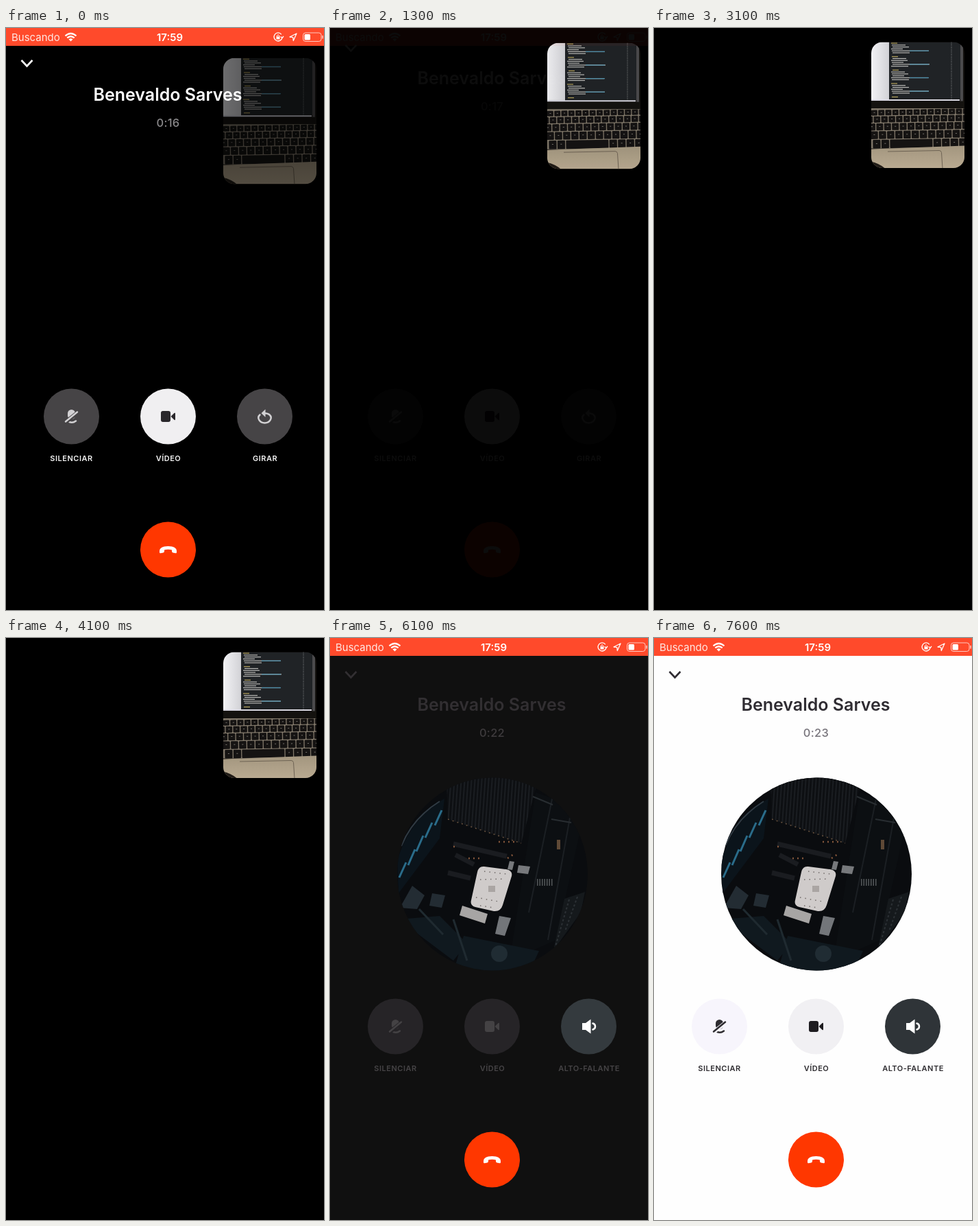
An HTML page for the animation above (8 s loop, 464 by 848 pixels).

```html
<!DOCTYPE html>
<html lang="pt">
<head>
<meta charset="utf-8">
<title>Chamada</title>
<style>
html, body { margin: 0; width: 100%; height: 100%; overflow: hidden; background: #000; }
svg { display: block; width: 464px; height: 848px; font-family: Inter, Roboto, sans-serif; }
.label text { font-size: 11px; font-weight: 600; letter-spacing: .5px; text-anchor: middle; fill: var(--label); }
.icon { fill: var(--icon); stroke: var(--icon); stroke-width: 0; }
.line { fill: none; stroke-width: 2.5; stroke-linecap: round; }
</style>
</head>
<body>
<svg viewBox="0 0 464 848">
  <defs>
    <clipPath id="thumbClip"><rect width="136" height="183.5" rx="16"/></clipPath>
    <clipPath id="avatarClip"><ellipse cx="237" cy="344" rx="139" ry="140.5"/></clipPath>
    <linearGradient id="palm" x2="0" y2="1"><stop stop-color="#a3967f"/><stop offset="1" stop-color="#b9aa91"/></linearGradient>
    <linearGradient id="page"><stop stop-color="#f2f2f5"/><stop offset="1" stop-color="#d2d2d6"/></linearGradient>
    <pattern id="ribs" width="5" height="10" patternUnits="userSpaceOnUse" patternTransform="skewX(-4)">
      <path d="M0 0H5V10H0Z" fill="#0d0f12"/><path d="M1 0V10" stroke="#202429" stroke-width="1.3"/>
    </pattern>
  </defs>

  <rect id="back" width="464" height="848"/>

  <g id="thumb"><g clip-path="url(#thumbClip)">
    <path d="M0 0H136V184H0Z" fill="#14120f"/>
    <path d="M0 0H26V84H0Z" fill="url(#page)"/>
    <path d="M26 0H130V83H26Z" fill="#202326"/>
    <path d="M117 0V83" stroke="#55585a" stroke-width="2" stroke-dasharray="1 1.5"/>
    <path d="M130 0H134V86H130Z" fill="#4b4a4c"/>
    <path d="M0 83.5H129V85.5H0Z" fill="#d9d8e2"/>
    <g id="code"></g>
    <path d="M0 96.5H136V155H0Z" fill="#81786a"/>
    <g id="keys"></g>
    <path d="M0 156L136 151V184H0Z" fill="url(#palm)"/>
    <path d="M24 159.5L99 158Q102 158 102.5 161L104 184" fill="none" stroke="#6d6253" stroke-width="1"/>
    <path d="M0 174Q12 177 20 184H0Z" fill="#211c17"/>
  </g></g>

  <rect id="dim" width="464" height="848"/>

  <g id="avatar" clip-path="url(#avatarClip)">
    <path d="M98 200H378V486H98Z" fill="#0a0c0f"/>
    <path d="M170 204L305 200 279 299 172 264Z" fill="url(#ribs)"/>
    <path d="M172 264L279 299" stroke="#67513d" stroke-width="1.5" stroke-dasharray="2 5"/>
    <path d="M300 225L372 250 330 440 262 470Z" fill="#0c0f12"/>
    <path d="M325 230L290 400M350 262L318 440" stroke="#1b1f23" stroke-width="2"/>
    <path d="M98 325Q115 265 167 234L160 292 100 372Z" fill="#0b141b"/>
    <path d="M104 303Q121 262 160 238" fill="none" stroke="#303b44" stroke-width="2"/>
    <path d="M163 251L153 273M149 269L139 291M136 288L126 311M124 308L114 331M111 327L101 349" stroke="#2a6c8a" stroke-width="3"/>
    <path d="M120 361L138 375 127 395 102 393ZM149 372L168 375 163 393 145 390Z" fill="#232c33"/>
    <path d="M100 410L160 405 200 445 180 470ZM195 434L305 456 290 488H180Z" fill="#10191f"/>
    <path d="M130 395L165 432M180 410L200 470" stroke="#1f2a30" stroke-width="3"/>
    <circle cx="247" cy="460" r="12" fill="#202c33"/>
    <path d="M180 300L258 318M172 342L205 350M183 316L210 330" stroke="#1a1c20" stroke-width="7"/>
    <path d="M202 321H222M246 297H272M259 321L268 315M180 304H184" stroke="#82553a" stroke-width="2.5" stroke-dasharray="2 5"/>
    <path d="M225 333L257 337Q267 339 265 347L252 389Q249 399 239 398L212 392Q204 390 206 382L215 341Q217 332 225 333Z" fill="#cfcbca"/>
    <path d="M225 340L258 344M219 352L254 351M213 378L246 384M219 390L239 393" stroke="#716b69" stroke-width="1.5" stroke-dasharray="1.5 6"/>
    <path d="M231 361H241V370H231Z" fill="#aaa5a3"/>
    <path d="M193 390L230 402 226 416 189 404Z" fill="#a7a5a4"/>
    <path d="M247 405L264 408 255 434 241 431Z" fill="#73767a"/>
    <path d="M275 331L292 333 289 344 273 342ZM262 325L269 326 266 338 259 337Z" fill="#77797c"/>
    <path d="M302 356H326" stroke="#55585b" stroke-width="10" stroke-dasharray="1.5 2"/>
    <path d="M331 294H336V308H331Z" fill="#5f4936"/>
    <path d="M342 380L372 370 366 400 326 455Z" fill="#15191c"/>
    <path d="M349 381L329 449M361 377L343 427" stroke="#2c3135" stroke-width="2" stroke-dasharray="3 3"/>
    <path d="M296 231L325 243M323 264L352 269" stroke="#282d31" stroke-width="2"/>
  </g>

  <g id="ui">
    <g fill="#fff" font-size="15">
      <rect width="464" height="26" fill="#ff4a2b"/>
      <text x="8" y="18.5" opacity=".87">Buscando</text>
      <text x="239" y="18.5" text-anchor="middle" font-weight="600">17:59</text>
      <g fill="none" stroke="#fff" stroke-width="2.3">
        <path d="M86.5 11.5Q94.5 4.5 102.5 11.5M89.3 14.4Q94.5 10 99.7 14.4"/>
        <path d="M91.5 16.5Q94.5 14 97.5 16.5L94.5 19.5Z" fill="#fff" stroke="none"/>
        <path d="M401.8 9.3A6 6 0 1 0 403 13.8M400.5 12.5L403 14.5 405 12" stroke-width="1.3"/>
        <path d="M394.5 12.5H399.5V16.5H394.5Z" fill="#fff" stroke="none"/>
        <path d="M395.5 13V11Q397 8.5 398.5 11V13" stroke-width="1"/>
        <path d="M424 8L414 13 418.7 13.7 419.3 18.5Z" stroke-width="1.3" stroke-linejoin="round"/>
        <rect x="433.5" y="7" width="26.5" height="12.5" rx="3.5" stroke-width="1" opacity=".7"/>
        <rect x="435.5" y="9" width="8.5" height="8.5" rx="1.5" fill="#fff" stroke="none"/>
        <path d="M462 11V15.5" stroke-width="1.5" opacity=".7"/>
      </g>
    </g>
    <path id="chevron" d="M22.5 47L30.5 55.5 38.5 47" fill="none" stroke="var(--name)" stroke-width="2.6"/>
    <g id="title" text-anchor="middle">
      <text x="236" y="106" font-size="25" font-weight="600" fill="var(--name)">Benevaldo Sarves</text>
      <text id="timer" x="236.5" y="144" font-size="16.5" font-weight="500" letter-spacing=".3" fill="var(--timer)"></text>
    </g>

    <circle cx="95.5" cy="566" r="40.5" fill="var(--button)"/>
    <g class="icon">
      <rect x="90" y="556" width="11" height="14" rx="5.5"/>
      <path class="line" d="M90 572.5Q96 577 102 572.5"/>
      <path d="M86 575L105 560" style="stroke:var(--button);stroke-width:6"/>
      <path class="line" d="M87 573.5L104 559.5"/>
    </g>

    <circle cx="236.5" cy="566" r="40.5" fill="var(--video)"/>
    <g fill="var(--videoIcon)">
      <rect x="226" y="558" width="14" height="16" rx="3"/>
      <path d="M240.5 566L245.5 561Q247 560 247 562V570Q247 572 245.5 571Z"/>
    </g>

    <circle cx="377.5" cy="566" r="40.5" fill="var(--right)"/>
    <g id="flip" class="icon">
      <path class="line" d="M370.5 563.5C365.5 568 370 575.5 377.5 575.5S389.5 568 384.5 563.5Q382 561.3 377 561.2"/>
      <path d="M372.5 561.3L378.5 555.5V567Z"/>
    </g>
    <g id="speaker" fill="#fff">
      <path d="M368 561H373L380.5 555.5V576.5L373 571H368Z"/>
      <path class="line" d="M383.5 561.5Q387 562.5 387 566T383.5 570.5" stroke="#fff"/>
    </g>

    <g class="label">
      <text x="95.5" y="631">SILENCIAR</text>
      <text x="237" y="631">VÍDEO</text>
      <text id="rightLabel" x="378" y="631"></text>
    </g>

    <circle cx="236.5" cy="760" r="40.5" fill="#ff3700"/>
    <path fill="#fff" d="M224 762Q224 757 231 755.5Q236.5 754.5 242 755.5Q249 757 249 762V764Q249 765.5 247.5 765.3L243.5 764.5Q242 764 242 762.5V760.5Q236.5 758.8 231 760.5V762.5Q231 764 229.5 764.5L225.5 765.3Q224 765.5 224 764Z"/>
  </g>
</svg>
<script>
(() => {
  const $ = id => document.getElementById(id);
  const svg = document.querySelector('svg');
  const LOOP = 8000, SWITCH = 6000, PRESS = 7500;

  const rect = (x, y, w, h, fill, rx = 0) =>
    `<rect x="${x}" y="${y}" width="${w}" height="${h}" rx="${rx}" fill="${fill}"/>`;

  // Code on the laptop screen
  const widths = [9, 20, 24, 17, 54, 25, 0];
  let code = '';
  for (let i = 0; i < 29; i++) {
    const w = widths[i % 7], y = 1 + i * 2.8;
    code += rect(29 + (i % 3), y, w, 1.2, i % 7 ? '#b9b9b5' : '#b5a45c');
    if (i % 7 === 4) code += rect(56, y, 28, 1.2, '#4d91ad');
  }
  $('code').innerHTML = code;

  // Keyboard rows grow towards the viewer
  let keys = '', rowY = 98;
  for (let r = 0; r < 5; r++) {
    const h = 8 + r * 1.1, w = 9 + r * .55;
    for (let x = r * 3 - 10; x < 136;) {
      const space = r === 4 && x > 18 && x < 30;
      const keyW = space ? 62 : w;
      keys += rect(x, rowY, keyW, h, '#151312', 1.2);
      if (!space) keys += rect(x + w * .4, rowY + h * .4, 2, 1, '#77736d');
      x += keyW + 1.3;
    }
    rowY += h + 1.2;
  }
  $('keys').innerHTML = `<g transform="rotate(-1 68 125)">${keys}</g>`;

  const ramp = (t, a, b) => {
    const x = Math.min(1, Math.max(0, (t - a) / (b - a)));
    return x * x * (3 - 2 * x);
  };
  const mix = (a, b, p) => `rgb(${a.map((v, i) => Math.round(v + (b[i] - v) * p))})`;
  const paint = colors => {
    for (const k in colors) svg.style.setProperty('--' + k, colors[k]);
  };
  const show = (id, on) => $(id).style.display = on ? '' : 'none';
  const place = (id, x, y) => $(id).setAttribute('transform', `translate(${x} ${y})`);

  const dark = {
    name: '#fff', timer: '#8b8a8c', label: '#f2f2f2', icon: '#d2d1d3',
    button: '#464446', video: '#f0eff1', videoIcon: '#29272b', right: '#464446'
  };
  const light = (p, pressed) => ({
    name: mix([50, 47, 50], [47, 44, 50], p),
    timer: mix([58, 55, 57], [120, 117, 124], p),
    label: mix([72, 70, 72], [46, 44, 48], p),
    icon: mix([70, 67, 69], [46, 44, 48], p),
    button: mix([24, 22, 24], [247, 245, 252], p),
    video: pressed ? '#f1f0f3' : mix([24, 22, 24], [247, 245, 252], p),
    videoIcon: pressed ? '#1e1c20' : mix([70, 67, 69], [46, 44, 48], p),
    right: mix([52, 58, 62], [47, 52, 56], p)
  });

  function draw(t) {
    const audio = t >= SWITCH;
    const shown = 1 - ramp(t, 1020, 1345) + ramp(t, 4590, 4900);
    const white = ramp(t, 6070, 6270);
    const lift = -23.2 * (1 - shown);

    $('back').setAttribute('fill', mix([0, 0, 0], [254, 254, 254], white));
    $('ui').setAttribute('opacity', shown);
    $('dim').setAttribute('opacity', shown * .55);
    place('thumb', 317, 43.7 + lift);
    place('chevron', 0, audio ? 2 : lift);
    place('title', 0, t < 3000 ? lift * 1.1 : 0);

    for (const id of ['thumb', 'dim', 'flip']) show(id, !audio);
    for (const id of ['avatar', 'speaker']) show(id, audio);
    $('rightLabel').textContent = audio ? 'ALTO-FALANTE' : 'GIRAR';
    $('timer').textContent = '0:' + (16 + Math.floor(t / 1000));
    paint(audio ? light(white, t >= PRESS) : dark);
  }

  const start = performance.now();
  function tick() {
    draw((performance.now() - start) % LOOP);
    requestAnimationFrame(tick);
  }
  tick();
})();
</script>
</body>
</html>
```
